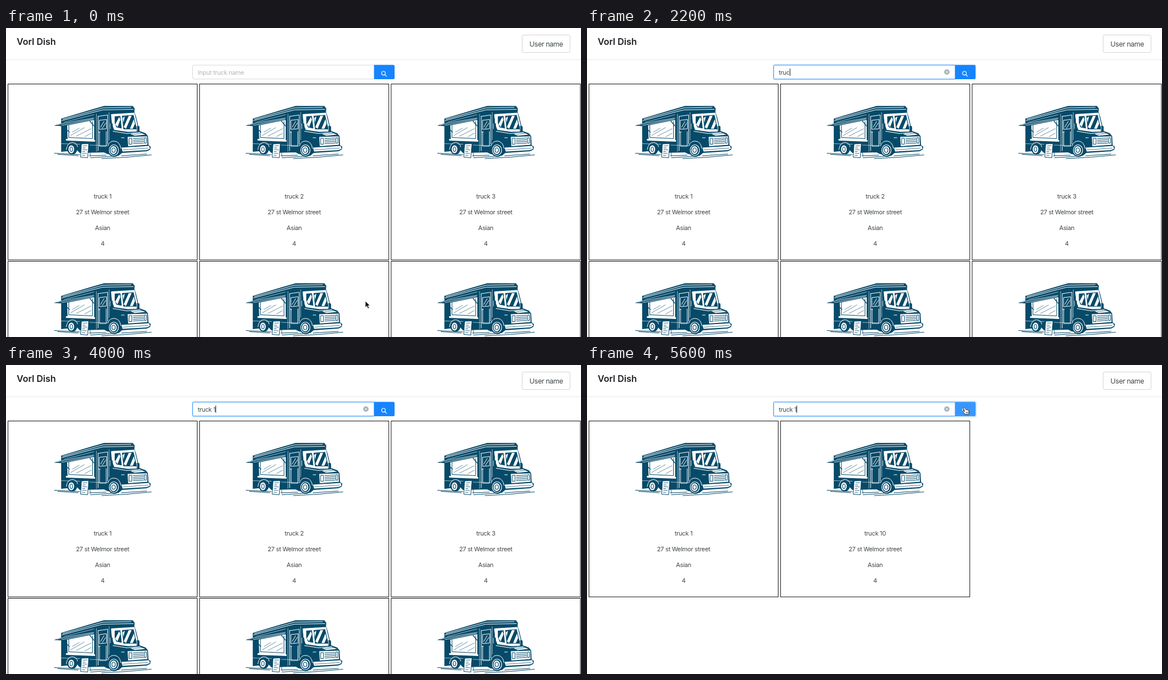
These frames come from a looping animation (1021 px wide and 549 px high, 5.8 s). An HTML page:

```html
<!DOCTYPE html>
<html lang="en">
<head>
<meta charset="utf-8">
<title>Food truck search</title>
<style>
html, body { margin: 0; width: 100%; height: 100%; overflow: hidden; background: #fff; }
svg { display: block; }
text { font: 400 10.9px Inter, Roboto, sans-serif; letter-spacing: -0.3px; fill: #3f464a; white-space: pre; }
.mid { text-anchor: middle; }
.title { font-size: 16px; font-weight: 600; letter-spacing: 0; fill: #1d2024; }
.user { font-size: 12.3px; letter-spacing: -0.4px; }
.ink { fill: #064a69; }
.line { fill: none; stroke: #064a69; stroke-linecap: round; stroke-linejoin: round; }
.cut { fill: none; stroke: #fff; stroke-linecap: round; stroke-linejoin: round; }
</style>
</head>
<body>
<svg width="1021" height="549" viewBox="0 0 1021 549">
<defs>
<g id="truck">
  <!-- ground strokes -->
  <path class="line" stroke-width="1" d="M86 222.5L131 225M92 224.5L128 227M150 230.5L187 228M170 232L215 229.5L258 225.5M205 227L250 224M148 227L178 226"/>
  <!-- body -->
  <path class="ink" d="M98 161L148 146L174 138.5L225 138.5L228.500 143L228 149L231 158L237 183L248 187L252 192L253 208L257 211L256 216L250 219L206 222L200 227L180 224L174 221L131 222L126 217L98 220Z"/>
  <path class="cut" stroke-width="1" d="M99.500 164.500L156 149.500L172 145.500L226 144.500M101 162L172 142L222 141"/>
  <path class="cut" stroke-width=".6" d="M103 167.500L156 154M160.500 153V219.500M183 150V199M98.500 205.500L131 206.500M149 208L181 209"/>
  <!-- serving hatch -->
  <path fill="#fff" d="M108.500 171L156.500 163V200.500L109.500 198.500Z"/>
  <path class="line" stroke-width="1" d="M111.500 172.500V194.500L153.500 196.500V166"/>
  <path class="line" stroke-width=".6" d="M115 191L139 177M125 192L151 179M118 185L130 178M140 193L151 187"/>
  <path fill="#fff" d="M106.500 197L158 199V202L106.500 200Z"/>
  <path class="ink" d="M85 173.500L104 167.500L160 157.500L158 163L101 174.500Z"/>
  <path class="cut" stroke-width=".8" d="M91 172.300L104 169L156 160M99 173L155 162"/>
  <path class="line" stroke-width="1.200" d="M100 173.500L112.500 185M149 165.500L156 174"/>
  <!-- door -->
  <path class="cut" stroke-width="1" d="M163.500 157L180.500 154.500V206M163.500 157V218M166 164L178.500 162.500V179L166 180Z"/>
  <path class="cut" stroke-width="1" d="M168 176L174 166M171 178L177 169M164.500 185L167 185M166 184V210H178V184"/>
  <!-- cab windows -->
  <path fill="#fff" d="M187 153L228 150.500L236 184L216 184.500L192 181L188 170Z"/>
  <path class="ink" d="M193 157L203 156.200L205.500 178.500L196 176.500L193 169ZM206 156L226.500 154.500L232.500 180L208.500 180Z"/>
  <path fill="#fff" d="M194 171L201 158L203 163L198 176ZM209 176L218 156L223 156L213 179ZM220 179L227 162L229 170L225 179ZM207 160L211 157L208.500 168Z"/>
  <path class="cut" stroke-width="1.100" d="M190 183.500L215 187.500L238 185.500M187 154L189 169"/>
  <rect class="ink" x="184.500" y="169" width="5" height="11" rx="2"/>
  <rect class="ink" x="231.500" y="174" width="5.500" height="11" rx="2"/>
  <path class="cut" stroke-width=".8" d="M185 170V179M232.500 175.500V183"/>
  <!-- hood and grille -->
  <path fill="#fff" d="M221 188L239 186.200L247.500 189.500L228 191.500Z"/>
  <path class="line" stroke-width=".6" d="M226 189.500L240 187.500"/>
  <path fill="#fff" d="M216 193.500L250.500 192.500L251 207.500L217 210Z"/>
  <path class="line" stroke-width="1.100" d="M226 196.500L244 195.500M226 199.500L244 198.500M226 202.500L244 201.500M226 205.500L244 204.500"/>
  <path class="line" stroke-width="1" d="M219 196H223.500V206.500H219ZM246 195H249V204.500H246Z"/>
  <path fill="#fff" d="M205 212.500L254 209.500L255.500 214.500L250 217L207 219.500Z"/>
  <path class="line" stroke-width=".7" d="M208 216.500L252 213.500"/>
  <path class="cut" stroke-width="1" d="M205 195H210M181 209Q184 200 193 201Q202 202 204 214"/>
  <!-- wheels -->
  <ellipse class="ink" cx="192" cy="217" rx="11" ry="12"/>
  <ellipse class="cut" cx="191.500" cy="217" rx="8.200" ry="9.500" stroke-width="1.200"/>
  <ellipse cx="191" cy="217" rx="5.600" ry="7" fill="#fff"/>
  <ellipse class="line" cx="191" cy="217" rx="3" ry="4" stroke-width="1.200"/>
  <ellipse class="ink" cx="117.500" cy="215" rx="9" ry="10"/>
  <path class="cut" stroke-width="1" d="M107 216Q109 203 118 203.500Q126 204 127 211"/>
  <ellipse cx="116" cy="215.500" rx="5" ry="7" fill="#fff"/>
  <ellipse class="line" cx="116" cy="215.500" rx="2.300" ry="4" stroke-width="1.100"/>
  <!-- menu board -->
  <path fill="#fff" stroke="#064a69" d="M134 206L147 205.500L145 230.500L132.500 229.500Z"/>
  <path class="line" stroke-width=".8" d="M137 209.500L144 209M136.500 213H141M136.500 216L143.500 216.500M136 219.500H140M136 222.500L143 223M135.500 226L140 226.500M147 207L150 228"/>
</g>
</defs>
<rect width="1021" height="549" fill="#fff"/>
<path d="M0 56.500H1021" stroke="#e8e8e8"/>
<text class="title" x="19" y="30">Vorl Dish</text>
<rect x="916.500" y="12.500" width="85" height="31" rx="2.500" fill="#fff" stroke="#d4d4d4"/>
<text class="user mid" x="959.300" y="33">User name</text>

<rect id="glow" x="329.800" y="64.300" width="325.500" height="28.400" rx="3.500" fill="#cfe6ff"/>
<rect id="halo" x="651.300" y="63.800" width="41" height="29.400" rx="3.500" fill="#d6e8fa"/>
<rect id="field" x="331.500" y="66" width="322.500" height="24.700" rx="2" fill="#fff"/>
<text id="hint" x="340.500" y="83" style="fill:#b5b5b5">Input truck name</text>
<text id="query" x="340.500" y="83"></text>
<path id="caret" stroke="#222" stroke-width="1"/>
<g id="clear">
  <circle cx="639" cy="78.200" r="4.800" fill="#a5b4b9"/>
  <path d="M637.200 76.400L640.800 80M640.800 76.400L637.200 80" stroke="#fff"/>
</g>
<path id="button" d="M653.500 65.500H687.500Q690 65.500 690 68V88.500Q690 91 687.500 91H653.500Z"/>
<g fill="none" stroke="#fff" stroke-width="1.200">
  <circle cx="670.300" cy="80.300" r="3.300"/><path d="M672.700 82.800L676 86.200"/>
</g>

<g id="cards"></g>

<g id="arrow"><path d="M0 0V11.500L2.700 9L4.700 13.500L6.800 12.600L4.900 8.200H8.400Z" fill="#111" stroke="#fff" stroke-width=".8"/></g>
<g id="beam" fill="none">
  <path d="M-3 -6Q0 -6 0 -4Q0 -6 3 -6M0 -4V4M-3 6Q0 6 0 4Q0 6 3 6M-1.500 2.500H1.500" stroke="#fff" stroke-width="2.600"/>
  <path d="M-3 -6Q0 -6 0 -4Q0 -6 3 -6M0 -4V4M-3 6Q0 6 0 4Q0 6 3 6M-1.500 2.500H1.500" stroke="#222" stroke-width="1.200"/>
</g>
<g id="hand">
  <path d="M-2.500 -5Q-1.300 -6 -.6 -4.500L.8 -1.500Q2 -2.500 2.800 -1.200Q4 -1.800 4.600 -.5Q6 -.8 6.300 1L6.500 4Q6.500 5.500 5.500 6.800H-.3L-4 2.800Q-5.500 1 -4.200 .5Q-3 .3 -1.600 1.600L-3.100 -3.200Q-3.500 -4.500 -2.500 -5Z" fill="#fff" stroke="#1a1a1a" stroke-width="1"/>
  <path d="M1.200 2V5M3 2V5M4.800 2V5" stroke="#1a1a1a" stroke-width=".7"/>
</g>
</svg>
<script>
const LOOP = 5800, STEP = 200;
const $ = id => document.getElementById(id);
const show = (id, on) => $(id).setAttribute('display', on ? 'inline' : 'none');

const typed = [[0, ''], [1600, 't'], [1800, 'tr'], [2000, 'tru'], [2200, 'truc'],
  [2400, 'truck'], [3000, 'truck '], [3800, 'truck 1']];
// pointer stops: time, x, y
const path = [[0, 638, 485], [200, 634, 470], [1000, 517, 85], [4400, 517, 85],
  [4600, 613.5, 67.5], [5000, 672, 81], [LOOP, 672, 81]];

function card(i, name) {
  const dx = i % 3 * 340.2, dy = Math.floor(i / 3) * 315;
  const lines = [name, '27 st Welmor street', 'Asian', '4'];
  return `<g transform="translate(${dx} ${dy})">
    <rect x="3.500" y="99.500" width="336" height="312.500" fill="#fff" stroke="#111"/>
    <use href="#truck"/>` +
    lines.map((s, k) => `<text class="mid" x="171.500" y="${302.5 + 28 * k}">${s}</text>`).join('') + '</g>';
}

let listed = '';
function list(names) {
  const key = names.join();
  if (key === listed) return;
  listed = key;
  $('cards').innerHTML = names.map((n, i) => card(i, n)).join('');
}

function pointer(t) {
  let i = 0;
  while (i < path.length - 2 && t >= path[i + 1][0]) i++;
  const [t0, x0, y0] = path[i], [t1, x1, y1] = path[i + 1];
  const u = (t - t0) / (t1 - t0), e = u * u * (3 - 2 * u);
  return [x0 + (x1 - x0) * e, y0 + (y1 - y0) * e];
}

function draw(time) {
  const t = Math.floor(time % LOOP / STEP) * STEP;
  const [x, y] = pointer(t);
  const inBar = y >= 66 && y <= 91;
  const onButton = inBar && x >= 654, onField = inBar && !onButton;
  const focus = t >= 1200 && t !== 5400;
  const text = typed.filter(k => k[0] <= t).pop()[1];
  const done = t >= 5600;

  show('glow', focus);
  show('halo', done);
  $('field').setAttribute('stroke', focus ? '#3c9bf5' : t === 5400 ? '#83b5d2' : onField ? '#62aee8' : '#d9d9d9');
  show('hint', !text);
  show('clear', text);
  $('query').textContent = text;
  const end = Math.round(340.5 + (text ? $('query').getComputedTextLength() : 0)) + .5;
  $('caret').setAttribute('d', `M${end} 72V85`);
  show('caret', focus);
  $('button').setAttribute('fill', onButton ? '#3897ff' : '#1684ff');

  const hidden = t >= 1600 && t < 4400;
  const shape = hidden ? '' : onButton ? 'hand' : onField ? 'beam' : 'arrow';
  for (const id of ['arrow', 'beam', 'hand']) {
    show(id, id === shape);
    $(id).setAttribute('transform', `translate(${x} ${y})`);
  }
  list((done ? [1, 10] : [1, 2, 3, 4, 5, 6]).map(n => 'truck ' + n));
}

const start = performance.now();
function tick() {
  draw(performance.now() - start);
  requestAnimationFrame(tick);
}
tick();
</script>
</body>
</html>
```
